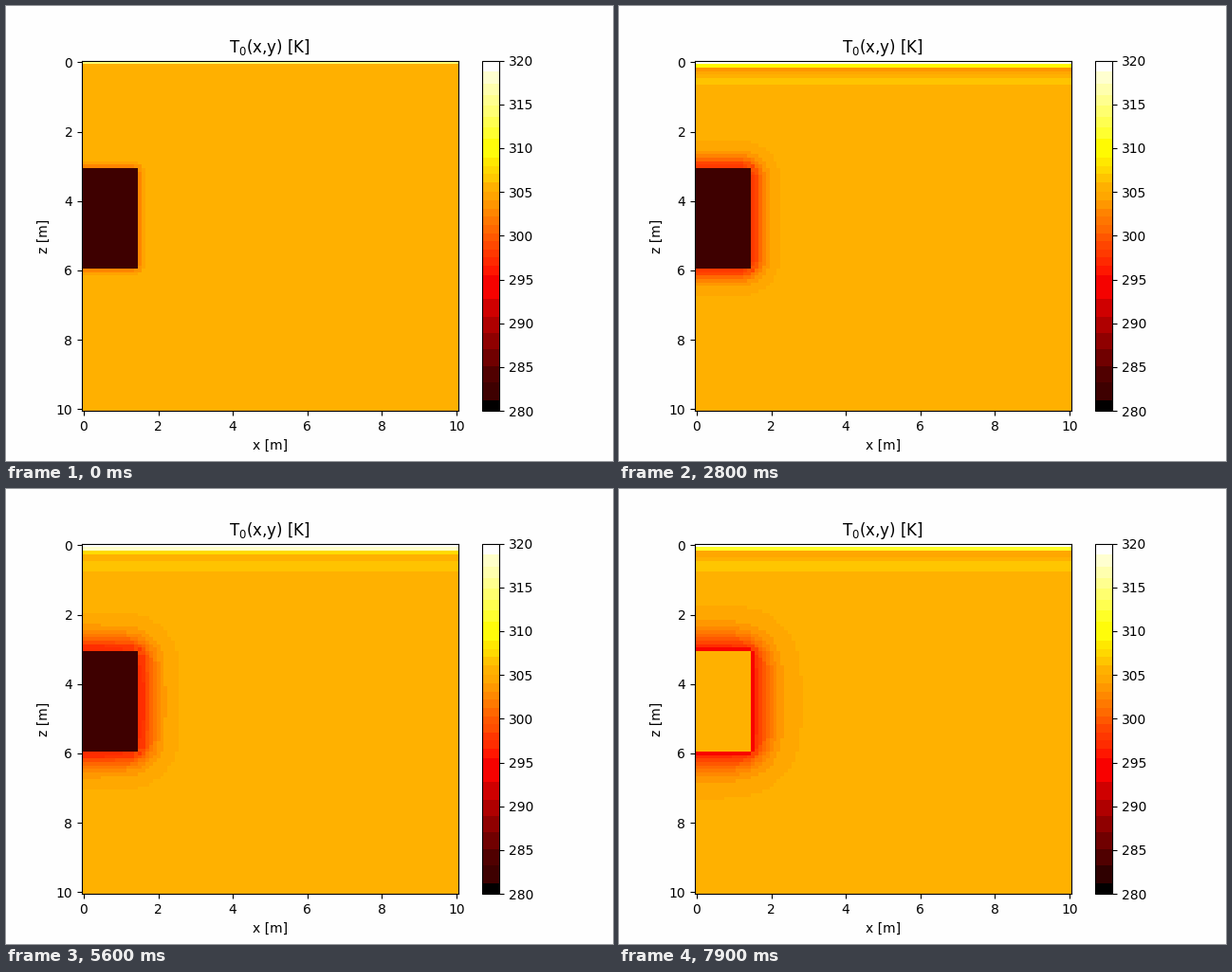
A matplotlib script that plays this animation: 640 px wide and 480 px high, repeating every 8 s.

```python
import numpy as np
import matplotlib.pyplot as plt
from matplotlib.animation import FuncAnimation
from matplotlib.colors import ListedColormap

FRAMES, INTERVAL = 80, 100
N = 101                          # grid points on 10 m
D = 0.2                          # diffusion number per step
GROUND, COLD = 305.15, 283.15
TMIN, TMAX = 280, 320
TANK = np.s_[31:60, 0:15]
PERIOD, SWING, OFFSET, PHASE = 25.2, 30, 3, -0.046


def diffuse(t):
    p = np.pad(t, 1, mode="edge")
    return t + D * (p[:-2, 1:-1] + p[2:, 1:-1] + p[1:-1, :-2] + p[1:-1, 2:] - 4 * t)


def surface(s):
    return GROUND + OFFSET + SWING * np.sin(2 * np.pi * (s / PERIOD + PHASE))


def simulate():
    t = np.full((N, N), GROUND)
    t[TANK] = COLD
    fields = []
    for s in range(1, FRAMES + 2):
        t = diffuse(t)
        t[0] = surface(s)
        t[TANK] = GROUND if s % 2 else COLD
        if s >= 2:
            fields.append(t.copy())
    return fields


HOT = np.round(plt.get_cmap("hot")(np.arange(256))[:, :3] * 255)
BINS = (HOT // [32, 16, 32]).astype(int) @ [128, 8, 1]
CELL_AREA, BAR_AREA = 14.4, 26
INK, PAPER = 3000, 150000


def banded(t):
    """Hot colour map in coarse bands, each the mean colour of its pixels."""
    level = np.clip((t - TMIN) / (TMAX - TMIN) * 256, 0, 255).astype(int)
    area = BAR_AREA + CELL_AREA * np.bincount(level.ravel(), minlength=256)
    total = np.bincount(BINS, area, minlength=1024)
    total[0] += INK
    total[1023] += PAPER
    bands = []
    for c in range(3):
        tone = np.bincount(BINS, area * HOT[:, c], minlength=1024)
        tone[1023] += PAPER * 254
        bands.append((tone[BINS] / total[BINS]) / 255)
    return ListedColormap(np.clip(np.stack(bands, axis=1), 0, 1))


fields = simulate()
axis = np.linspace(0, 10, N)

fig, ax = plt.subplots(figsize=(6.4, 4.8), dpi=100, facecolor="#fefefe")
mesh = ax.pcolormesh(axis, axis, fields[0], cmap=banded(fields[0]),
                     vmin=TMIN, vmax=TMAX, shading="nearest")
fig.colorbar(mesh, ax=ax)
ax.invert_yaxis()
ax.set_title("T$_0$(x,y) [K]")
ax.set_xlabel("x [m]")
ax.set_ylabel("z [m]")


def update(i):
    mesh.set_array(fields[i])
    mesh.set_cmap(banded(fields[i]))
    return mesh,


anim = FuncAnimation(fig, update, frames=FRAMES, interval=INTERVAL,
                     repeat=True, repeat_delay=0, blit=False)
plt.show()
```
